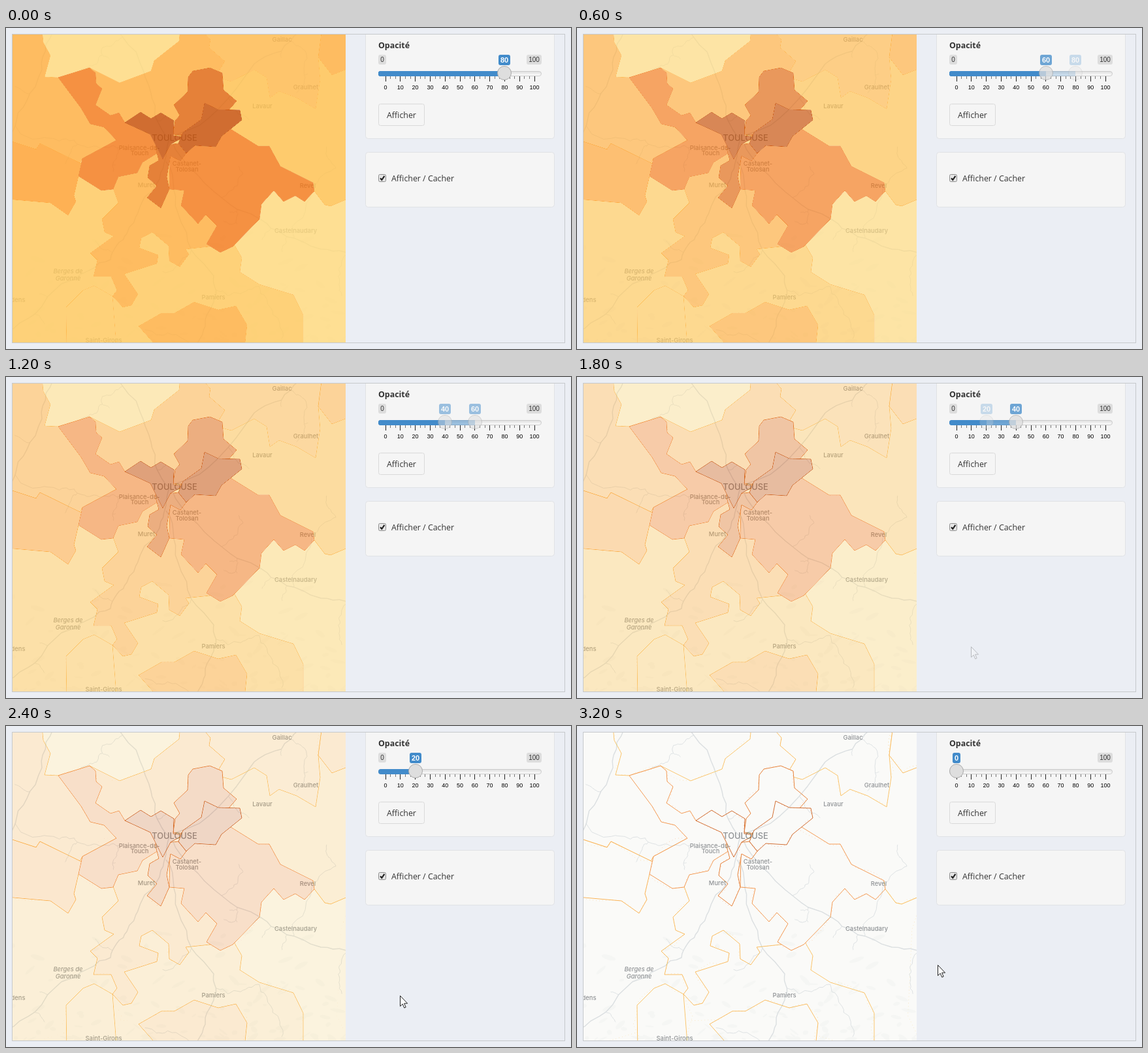
An HTML page that plays this animation: 865 px wide and 492 px high, repeating every 3400 ms.

```html
<!DOCTYPE html>
<html lang="fr">
<head>
<meta charset="utf-8">
<title>Opacité</title>
<style>
@property --p { syntax: "<number>"; inherits: true; initial-value: 0; }
/* --p runs over five slider settings, four hard steps between each pair */
@keyframes run { from { --p: 0; } to { --p: 4; } }
html, body { margin: 0; width: 100%; height: 100%; overflow: hidden; background: #ebeef4; }
svg { display: block; width: 865px; height: 492px; animation: run 3.4s steps(17, jump-none) infinite; }
#fills { opacity: calc(.8 - .2 * var(--p)); }
/* white interiors hide the lines below them and vanish in the blend */
#lines { fill: #fff; stroke-linejoin: round; opacity: .8; mix-blend-mode: darken; }
.dots { fill: none; stroke-width: .8; stroke-dasharray: 1 4; opacity: .6; }
#rivers { fill: none; stroke: #dbdfe1; stroke-linejoin: round; }
#names { font: 500 9.4px Inter, "Open Sans", sans-serif; fill: #8f9295; text-anchor: middle; }
.state { opacity: clamp(0, 1 - max(var(--p) - var(--k), var(--k) - var(--p)), 1); }
.bar { opacity: clamp(0, var(--k) + 1 - var(--p), 1); fill: #428bca; }
#min { opacity: clamp(0, 4 - var(--p), 1); }
.ui { font: 12.4px "Open Sans", "Noto Sans", sans-serif; fill: #333; }
.title { font-weight: 700; }
.small { font: 10px Arial, "Liberation Sans", sans-serif; fill: #333; text-anchor: middle; }
.grid { font-size: 9px; fill: #000; }
.value { font: bold 11px Arial, "Liberation Sans", sans-serif; fill: #fff; text-anchor: middle; }
.panel { fill: #f5f5f5; stroke: #e0e2e5; }
</style>
</head>
<body>
<svg viewBox="0 0 865 492">
  <defs>
    <clipPath id="mapClip"><rect x="10" y="10" width="510" height="472"/></clipPath>
    <clipPath id="boxClip"><rect x="10" y="10" width="845" height="472"/></clipPath>
    <linearGradient id="track" x2="0" y2="1"><stop stop-color="#dedede"/><stop offset="1" stop-color="#fff"/></linearGradient>
    <path id="arrow" d="M.5 .5V16.6L4.2 13.1 6.8 19.1 9.2 18 6.6 12.2H11.6Z" fill="#fff" stroke="#222"/>
  </defs>

  <g clip-path="url(#mapClip)">
    <rect x="10" y="10" width="510" height="472" fill="#fafaf8"/>
    <g id="relief" fill="#f5f6f4"></g>
    <g id="rivers"></g>
    <g id="names"></g>
    <g id="fills"></g>
    <g id="lines"></g>
  </g>

  <g clip-path="url(#boxClip)">
    <rect class="panel" x="550.5" y="-20" width="289" height="189.5" rx="4"/>
    <rect class="panel" x="550.5" y="190.5" width="289" height="84" rx="4"/>
  </g>
  <rect x="9.5" y="9.5" width="846" height="473" fill="none" stroke="#c6c9cc"/>

  <text class="ui title" x="570" y="31">Opacité</text>
  <g id="min"><rect x="570" y="41" width="12" height="15" rx="3" fill="#ddd"/><text class="small" x="576" y="52">0</text></g>
  <rect x="797" y="41" width="23" height="15" rx="3" fill="#ddd"/><text class="small" x="808.5" y="52">100</text>
  <g id="grid"></g>
  <rect x="570.5" y="66.5" width="249" height="7" rx="3.5" fill="url(#track)" stroke="#ccc"/>
  <g id="bars"></g>
  <g id="knobs"></g>

  <rect x="570.5" y="116.5" width="70" height="33" rx="3" fill="#f5f5f5" stroke="#dadada"/>
  <text class="ui" x="583" y="138">Afficher</text>

  <rect x="570.5" y="224.5" width="11" height="11" rx="2" fill="#e6e6e6" stroke="#8e8e8e"/>
  <path d="M573 230.3L575.3 232.8 579.4 226.8" fill="none" stroke="#222" stroke-width="2.2"/>
  <text class="ui" x="590" y="235">Afficher / Cacher</text>

  <g class="state" style="--k:3"><use href="#arrow" x="603" y="413"/></g>
  <g class="state" style="--k:4"><use href="#arrow" x="552" y="366"/></g>
</svg>
<script>
const $ = id => document.getElementById(id);

function add(parent, tag, attrs, text) {
  const el = document.createElementNS("http://www.w3.org/2000/svg", tag);
  for (const key in attrs) el.setAttribute(key, attrs[key]);
  if (text) el.textContent = text;
  parent.appendChild(el);
  return el;
}

let seed = 7;
const rand = () => (seed = seed * 16807 % 2147483647) / 2147483647;
const jit = n => (rand() - .5) * n;
const parse = s => s.split(" ").map(q => q.split(",").map(Number));
const dist = (a, b) => Math.hypot(b[0] - a[0], b[1] - a[1]);

// Subdivide a polyline, pushing each midpoint aside.
function wiggle(pts, rough, depth) {
  for (; depth > 0; depth--) {
    const out = [pts[0]];
    for (let i = 1; i < pts.length; i++) {
      const [a, b] = [pts[i - 1], pts[i]];
      const d = rough * dist(a, b);
      out.push([(a[0] + b[0]) / 2 + jit(d), (a[1] + b[1]) / 2 + jit(d)], b);
    }
    pts = out;
  }
  return pts;
}

// Relief, denser towards the southern hills
for (let i = 0; i < 110; i++) {
  const x = 10 + rand() * 510, y = 482 - rand() * rand() * 200;
  add($("relief"), "ellipse", { cx: x, cy: y, rx: 3 + rand() * 9, ry: 1 + rand() * 3,
    transform: `rotate(${jit(90)} ${x} ${y})` });
}

// Main rivers by a few points, then brooks that each run to the nearest water
const river = (pts, width) => add($("rivers"), "polyline", { points: pts.join(" "), "stroke-width": width });
const water = [];
for (const s of [
  "250,170 230,240 185,315 160,355 85,392 5,464",
  "245,205 262,280 318,380 318,420 290,490",
  "250,170 222,100 172,5",
  "72,5 45,90 5,190",
  "255,175 330,260 430,320 525,345",
  "255,165 380,55 450,5"
]) {
  const pts = wiggle(parse(s), .2, 3);
  river(pts, 1.4);
  water.push(...pts);
}
for (let i = 0; i < 34; i++) {
  const from = [10 + rand() * 510, 10 + rand() * 472];
  const to = water.reduce((a, b) => dist(from, b) < dist(from, a) ? b : a);
  const pts = wiggle([from, to], .35, 4);
  river(pts, .9);
  water.push(...pts);
}

// Place names: text, centre, baseline
for (const [text, x, y, style = ""] of [
  ["Gaillac", 422.5, 21], ["Graulhet", 459, 94], ["Lavaur", 392.5, 123],
  ["TOULOUSE", 258, 173, "font-size:12.8px"],
  ["Plaisance-du-", 204, 187], ["Touch", 204.5, 195],
  ["Castanet-", 277, 211], ["Tolosan", 277, 220], ["Muret", 215, 244], ["Revel", 462, 245],
  ["Castelnaudary", 443.5, 314], ["Pamiers", 317.5, 416], ["Saint-Girons", 149.5, 482],
  ["Berges de", 95, 376, "font-style:italic"], ["Garonne", 95, 387, "font-style:italic"],
  ["dens", 18.5, 420]
]) add($("names"), "text", { x, y, style }, text);

// Districts, painted upwards: each hides what lies under it,
// so only the visible side of a lower one needs care.
const shade = {
  pale: "#ffd97a", sand: "#ffc85a", straw: "#ffc04b", honey: "#ffb84a", apricot: "#ffad3c",
  tangerine: "#ffa02c", orange: "#f47715", rust: "#e0640a", brown: "#c64b00"
};
const edge = { ...shade, pale: "#ffb648", sand: "#ffb648", straw: "#ffb648", honey: "#ffb648", orange: "#f0822a" };
for (const [tone, points] of [
  ["sand", "-9,-9 540,-9 540,500 -9,500"],
  ["sand", "93,500 92,428 118,402 135,395 163,411 170,500"],
  ["straw", "290,0 530,0 530,259 497,273 488,271 472,250 300,200"],
  ["pale", "358,374 361,352 350,333 340,300 400,225 472,250 488,271 497,273 530,259 530,492 455,492 455,440 440,409 388,393"],
  ["honey", "290,0 320,75 345,82 380,64 399,76 404,107 418,97 445,107 474,124 481,79 478,45 484,0"],
  ["apricot", "484,0 478,45 499,72 530,60 530,0"],
  ["apricot", "203,457 238,437 258,437 288,420 325,432 352,426 369,455 365,492 234,492"],
  ["apricot", "0,0 60,0 90,60 120,110 169,172 117,200 113,207 52,177 46,186 0,171"],
  ["tangerine", "0,171 46,186 52,177 130,215 111,227 104,257 107,266 95,287 68,268 0,262"],
  ["apricot", "120,60 267,0 297,0 313,18 311,30 335,51 326,66 300,180 140,140"],
  ["pale", "55,0 57,22 68,42 59,75 80,76 128,61 174,84 222,66 227,50 265,20 267,0"],
  ["apricot", "160,235 172,268 147,293 151,313 165,319 129,345 140,356 134,381 161,381 170,402 163,411 179,428 192,425 202,408 181,377 231,361 233,348 204,337 207,322 224,313 249,334 250,357 266,366 280,347 275,339 330,333 330,290 290,260 245,190 210,190"],
  ["orange", "80,76 128,61 137,69 138,85 147,93 137,118 160,134 173,130 182,145 240,165 233,191 209,206 201,222 172,228 164,247 146,249 111,227 117,200 169,172 150,152 129,147 115,123"],
  ["orange", "320,140 386,181 403,181 420,212 470,237 472,250 457,266 443,257 425,266 410,249 391,270 388,293 347,335 328,344 307,331 323,303 306,286 294,300 268,272 273,249 250,247 251,196 276,192"],
  ["rust", "257,118 278,98 279,75 286,66 312,61 331,69 333,95 353,112 320,150 271,165 256,163 259,142 266,134"],
  ["rust", "228,181 264,177 276,192 267,204 252,196 246,228 250,247 237,276 216,260 231,242 217,229 220,211 234,203"],
  ["brown", "182,145 206,129 222,139 237,130 257,142 256,165 272,167 252,178 240,201 221,163"],
  ["brown", "304,115 325,125 358,126 361,141 330,166 321,182 289,180 276,192 264,177 271,160 299,140"]
]) {
  add($("fills"), "polygon", { points, fill: shade[tone] });
  add($("lines"), "polygon", { points, stroke: edge[tone] });
  add($("lines"), "polyline", { class: "dots", points: wiggle(parse(points), .25, 2).join(" "), stroke: edge[tone] });
}

// Slider
const pos = v => 581 + v * 2.28;
for (let i = 0; i <= 30; i++) {
  const big = i % 3 === 0, x = pos(i * 10 / 3);
  add($("grid"), "rect", { x: Math.floor(x), y: 74, width: 1, height: big ? 8 : 4, fill: big ? "#222" : "#777" });
  if (big) add($("grid"), "text", { class: "small grid", x, y: 94 }, String(i / 3 * 10));
}
for (let k = 0; k < 5; k++) {
  const v = 80 - 20 * k, x = Math.round(pos(v)), w = v ? 18 : 12, style = `--k:${k}`;
  if (v) add($("bars"), "path", { class: "bar", style, d: `M${x} 66H574a4 4 0 0 0 0 8H${x}Z` });
  const g = add($("knobs"), "g", { class: "state", style });
  add(g, "rect", { x: x - w / 2, y: 41, width: w, height: 16, rx: 3, fill: "#428bca" });
  add(g, "text", { class: "value", x, y: 53 }, String(v));
  add(g, "circle", { cx: x, cy: 69, r: 10.5, fill: "#dedede", stroke: "#aaa" });
}
</script>
</body>
</html>
```
